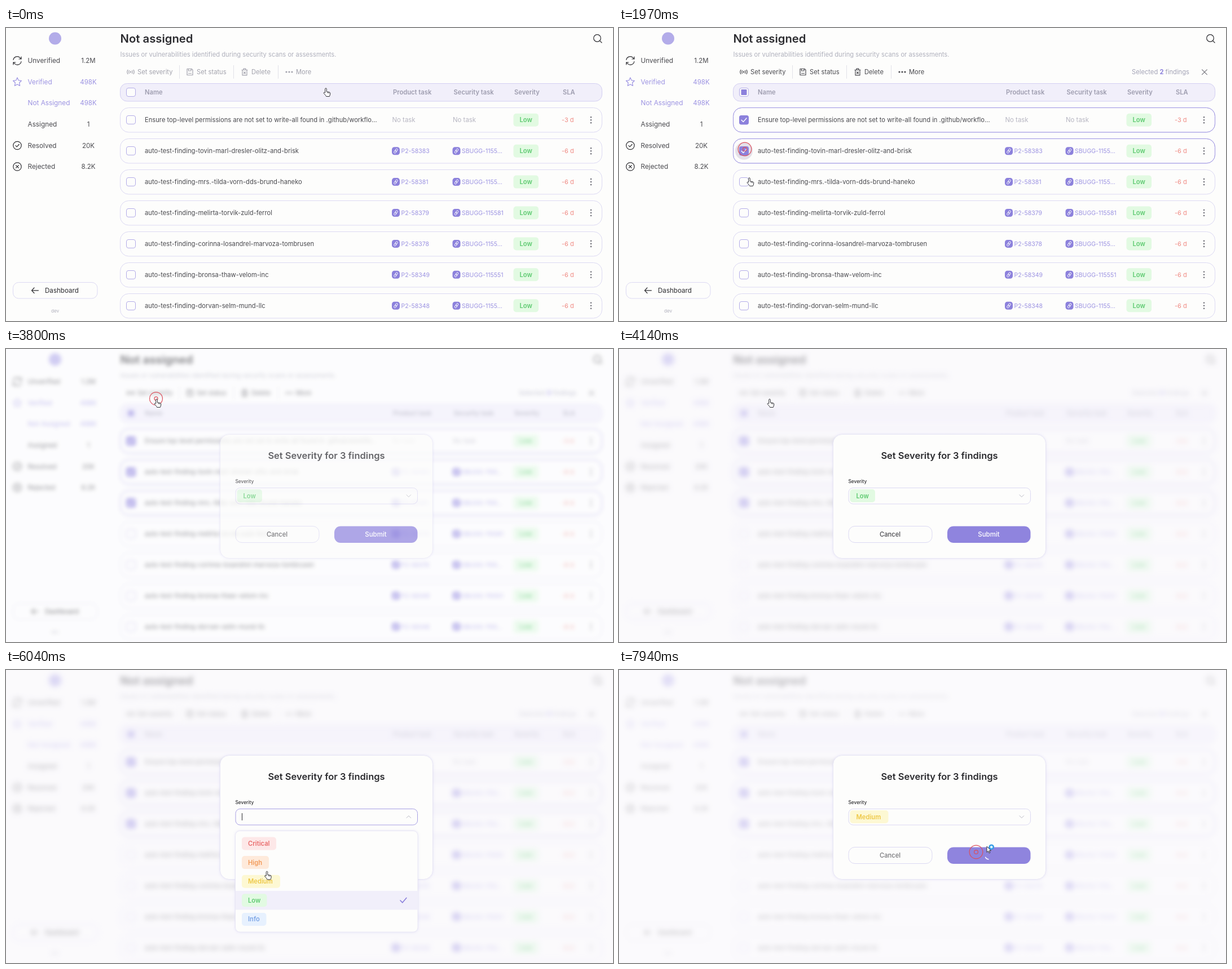
Animation, 1076 px wide and 520 px high, one loop 8 s. Source, as an HTML page:

```html
<!DOCTYPE html>
<html lang="en">
<head>
<meta charset="utf-8">
<title>Findings</title>
<style>
html, body { margin: 0; width: 100%; height: 100%; overflow: hidden; background: #fdfdfc; }
svg { position: fixed; left: 0; top: 0; width: 100%; height: 100%; display: block; }
text { font-family: Inter, "Open Sans", sans-serif; font-size: 11.2px; fill: #4a4a4f; white-space: pre; }
.line { fill: none; stroke-width: 1.2; stroke-linecap: round; stroke-linejoin: round; }
</style>
</head>
<body>
<svg id="stage" viewBox="0 0 1076 520"></svg>
<script>
const LOOP = 8000;
const INK = '#4a4a4f', DARK = '#2b2b2f', PURPLE = '#8c81dc', SOFT = '#9c93e2', EDGE = '#dcd9f3', MUTED = '#b0b1bd', PALE = '#fdfdfc';
const LEVELS = {
  Critical: ['#fde8e8', '#e96c6c', 61],
  High: ['#feeadb', '#f29a59', 48],
  Medium: ['#fdf8d3', '#eec846', 68],
  Low: ['#e2fae2', '#5dca70', 44.5],
  Info: ['#e7f1fe', '#7ca5e6', 43.5]
};

const attrs = o => Object.entries(o).map(([k, v]) => ` ${k}="${v}"`).join('');
const ink = (color, size, o = {}) => ({ style: `fill:${color}` + (size ? `;font-size:${size}px` : ''), ...o });
const text = (x, y, s, o = {}) => `<text x="${x}" y="${y}"${attrs(o)}>${s}</text>`;
const box = (x, y, w, h, r, o = {}) =>
  `<rect x="${x}" y="${y}" width="${w}" height="${h}" rx="${r}"${attrs({ fill: 'none', ...o })}/>`;
const line = (d, color, o = {}) => `<path class="line" d="${d}" stroke="${color}"${attrs(o).replace(/ stroke-width="([^"]+)"/, ' style="stroke-width:$1"')}/>`;
const dot = (x, y, r, o = {}) => `<circle cx="${x}" cy="${y}" r="${r}"${attrs(o)}/>`;
const group = (id, body, o = {}) => `<g id="${id}"${attrs(o)}>${body}</g>`;
const at = (x, y, body) => `<g transform="translate(${x} ${y})">${body}</g>`;
const mid = { 'text-anchor': 'middle' }, bold = { 'font-weight': 600 };
const chip = (x, cy, name) => {
  const [bg, fg, w] = LEVELS[name];
  return box(x, cy - 11.5, w, 23, 5, { fill: bg }) + text(x + 11, cy + 4, name, ink(fg, 11.2, bold));
};

// Sidebar
const round = dot(0, 0, 7.2, { fill: 'none', stroke: DARK, 'stroke-width': 1.2 });
const icons = {
  sync: line('M-7 -1.5A7 7 0 0 1 5.5 -4.5L7 -3M7 -7V-3H3M7 1.5A7 7 0 0 1 -5.5 4.5L-7 3M-7 7V3H-3', DARK),
  star: line('M0 -7.5L2.2 -2.6 7.4 -2 3.6 1.7 4.6 7 0 4.4 -4.6 7 -3.6 1.7 -7.4 -2 -2.2 -2.6Z', SOFT),
  done: round + line('M-3 .2L-.8 2.4 3.2 -2', DARK),
  drop: round + line('M-2.4 -2.4L2.4 2.4M2.4 -2.4L-2.4 2.4', DARK)
};
const menu = [
  ['Unverified', '1.2M', 58, 'sync'], ['Verified', '498K', 95.5, 'star', SOFT],
  ['Not Assigned', '498K', 133, '', SOFT], ['Assigned', '1', 170.5, ''],
  ['Resolved', '20K', 208.5, 'done'], ['Rejected', '8.2K', 246, 'drop']
];
const sidebar = dot(87, 18.5, 11, { fill: '#b3ace9' }) +
  menu.map(([name, count, y, icon, color = INK]) =>
    (icon ? at(20, y, icons[icon]) : '') +
    text(38.5, y + 4, name, ink(color, 11.8)) +
    text(146, y + 4, count, ink(color, 11.5, mid))).join('') +
  box(12.5, 451.5, 149.5, 28.5, 10, { stroke: EDGE }) +
  line('M57.5 465.8H45.5M50 461L45.5 465.8 50 470.5', DARK) +
  text(69, 469.5, 'Dashboard', ink(DARK, 11.6)) +
  text(87, 505, 'dev', ink(MUTED, 8.2, mid));

// Toolbar
const tools = [
  ['Set severity', 221, 233, (c) => dot(0, 0, 1.3, { fill: c }) +
    line('M-2.6 -2.5Q-4.2 0 -2.6 2.5M2.6 -2.5Q4.2 0 2.6 2.5M-5 -3.6Q-7.4 0 -5 3.6M5 -3.6Q7.4 0 5 3.6', c)],
  ['Set status', 326, 338, (c) => line('M-5 -5.5H3L5 -3.5V5.5H-5ZM-2.5 -5.5V-2H2V-5.5M-2.5 2.5H2.5', c)],
  ['Delete', 423, 435, (c) => line('M-5 -3.5H5M-2 -3.5V-5.8H2V-3.5M-4 -3.5V5.8H4V-3.5M-1.5 0L1.5 3M1.5 0L-1.5 3', c)],
  ['More', 502, 514, (c) => [-5, 0, 5].map(x => dot(x, 0, 1.6, { fill: c })).join('')]
];
const tool = ([name, ix, x, icon], color) => at(ix, 78, icon(color)) + text(x, 81.5, name, ink(color));
const toolbar =
  group('hover', box(202, 66, 106, 24, 4, { fill: '#efedfa' })) +
  group('toolsOff', tools.map(t => tool(t, '#a3a3ad')).join('')) +
  group('toolsOn', tools.slice(1).map(t => tool(t, INK)).join('') +
    group('sevInk', tool(tools[0], INK)) + group('sevHot', tool(tools[0], SOFT)) +
    `<text x="909" y="81.5" style="fill:#a3a3b6">Selected <tspan id="count" font-weight="700" fill="${PURPLE}">1</tspan> findings</text>` +
    line('M1033.5 73.8L1042.3 82.6M1042.3 73.8L1033.5 82.6', '#77777f')) +
  [307.5, 403.5, 482.5].map(x => line(`M${x} 66.5V89.5`, '#e2e2e8', { 'stroke-width': 1 })).join('');

// Table
const emptyBox = (cy) => box(213.5, Math.round(cy - 8) + .5, 16, 15, 3.5, { stroke: '#b3ace8', fill: PALE });
const header = box(202.5, 98.5, 854, 31.5, 12, { fill: '#f1effa', stroke: '#d3cff2' }) +
  emptyBox(114) + group('some', box(216.5, 109, 10, 10, 1, { fill: PURPLE })) +
  [[246, 'Name'], [686, 'Product task'], [793.5, 'Security task'], [901, 'Severity'], [987, 'SLA']]
    .map(([x, s]) => text(x, 118, s, ink('#9e9daf', 11.2, bold))).join('');

const rows = [
  ['Ensure top-level permissions are not set to write-all found in .github/workflo…'],
  ['tovin-marl-dresler-olitz-and-brisk', '58383', '1155…'],
  ['mrs.-tilda-vorn-dds-brund-haneko', '58381', '1155…'],
  ['melirta-torvik-zuld-ferrol', '58379', '115581'],
  ['corinna-losandrel-marvoza-tombrusen', '58378', '1155…'],
  ['bronsa-thaw-velom-inc', '58349', '115551'],
  ['dorvan-selm-mund-llc', '58348', '1155…']
];
const rowY = i => 163.3 + i * 54.9;
const ring = x => box(x, -1.7, 5.4, 3.4, 1.7, { stroke: '#fff', 'stroke-width': .9 });
const link = (x, cy, s) => box(x, cy - 7, 14, 14, 4.5, { fill: PURPLE }) +
  at(x + 7, cy, `<g transform="rotate(-55)">${ring(-4.5)}${ring(-.9)}</g>`) +
  text(x + 16.5, cy + 4, s, ink(SOFT, 10.5));
const row = ([name, task, bug], i) => {
  const y = rowY(i);
  const card = color => box(202.5, Math.round(y - 22) + .5, 854, 43.5, 15, { stroke: color });
  const none = x => text(x, y + 4, 'No task', ink('#b7b6c2', 11.4));
  return card(EDGE) +
    (i < 3 ? group('ripple' + i, dot(221.5, y, 15.5, { fill: '#e4e1e9' })) : '') + emptyBox(y) +
    (i < 3 ? group('pick' + i, card(SOFT) +
      box(213, y - 8.3, 17, 16.5, 4, { fill: PURPLE }) +
      line(`M217 ${y}L220.3 ${y + 3.3} 226 ${y - 3.3}`, '#fff', { 'stroke-width': 1.4 })) : '') +
    text(246, y + 4, (task ? 'auto-test-finding-' : '') + name) +
    (task ? link(684, y, 'P2-' + task) + link(791.5, y, 'SBUGG-' + bug) : none(684.5) + none(792)) +
    chip(899.5, y, 'Low') +
    text(985, y + 4, task ? '-6 d' : '-3 d', ink('#ef8a83', 11)) +
    [-5, 0, 5].map(d => dot(1037, y + d, 1.3, { fill: '#74747c' })).join('');
};

const page = sidebar +
  text(202.5, 26, 'Not assigned', ink(DARK, 20.3, bold)) +
  text(202.5, 51, 'Issues or vulnerabilities identified during security scans or assessments.', ink(MUTED)) +
  dot(1048, 18, 6.3, { fill: 'none', stroke: DARK, 'stroke-width': 1.2 }) + line('M1052.8 22.8L1056 26', DARK) +
  toolbar + header + rows.map(row).join('');

// Dialog
const dialog = box(379.5, 151.5, 377, 220, 16, { fill: PALE, stroke: '#e8e6f5', filter: 'url(#soft)' }) +
  text(568, 195, 'Set Severity for 3 findings', ink(DARK, 16.5, { ...mid, ...bold })) +
  text(406.5, 238.3, 'Severity', ink(DARK, 8.3, { 'font-weight': 500 })) +
  box(407, 246.5, 322.5, 28.5, 8, { id: 'field' }) +
  group('low', chip(409.5, 260.5, 'Low')) + group('medium', chip(409.5, 260.5, 'Medium')) +
  group('caret', line('M418.5 254.5V266.5', DARK, { 'stroke-width': 1 })) +
  line('', '#b9b9c4', { id: 'chevron', 'stroke-width': 1 }) +
  box(407, 314.5, 148, 29, 11, { stroke: EDGE }) +
  text(480.5, 333, 'Cancel', { ...mid, id: 'cancel', 'font-weight': 500 }) +
  box(582, 314.5, 147.5, 29.5, 11, { fill: '#8f84de' }) +
  text(655.5, 333, 'Submit', ink('#fff', 11.5, { ...mid, id: 'submit', 'font-weight': 500 })) +
  at(655.5, 329.5, line('M6.5 0A6.5 6.5 0 0 1 3.25 5.63', '#fff', { id: 'spin', 'stroke-width': 1.5 }));

const list = box(406.5, 285.5, 323.5, 179.5, 8, { fill: PALE, stroke: '#e8e6f5', filter: 'url(#soft)' }) +
  box(407, 392, 322.5, 33.5, 0, { fill: '#f1effa' }) +
  line('M699 409L702.8 412.8 709.8 404.5', PURPLE, { 'stroke-width': 1.7 }) +
  Object.keys(LEVELS).map((name, i) => chip(418, 308 + i * 33.6, name)).join('');

const shape = (d) => `<path d="${d}" fill="#fff" stroke="#333338" stroke-linejoin="round"/>`;
const arrow = shape('M0 0V10.5L2.5 8.2 4.2 12 5.8 11.3 4.2 7.6H7.5Z');
const pointers = {
  hand: shape('M-1.3 8V1.2a1.3 1.3 0 0 1 2.6 0V6l5 1q1.6 .4 1.5 2l-.5 3-1 2.5h-5.6l-1.3-2.2-3.2-3.6q-.2-1.6 1.2-1.4z') +
    line('M3.2 6.6V8.6M5.4 7V9', '#333338', { 'stroke-width': .8 }),
  arrow,
  beam: line('M-2.5 -5H-.6L0 -4.4 .6 -5H2.5M0 -4.4V4.4M-2.5 5H-.6L0 4.4 .6 5H2.5', '#333338', { 'stroke-width': 1 }),
  busy: arrow + dot(8.2, 1.2, 3.6, { fill: '#d9f0fd', stroke: '#2f9ae6', 'stroke-width': 2.4 })
};

const stage = document.getElementById('stage');
stage.innerHTML =
  '<filter id="soft" x="-10%" y="-10%" width="120%" height="120%"><feDropShadow dx="0" dy="0" stdDeviation="2" flood-color="#8c81dc" flood-opacity=".2"/></filter>' +
  box(0, 0, 1076, 520, 0, { fill: PALE }) + group('page', page) +
  box(0, 0, 1076, 520, 0, { id: 'veil', fill: '#faf9fe' }) +
  group('dialog', dialog) + group('list', list) +
  [0, 1].map(i => dot(0, 0, 0, { id: 'ring' + i, fill: 'none', stroke: '#dc4f5c', 'stroke-width': 1.2 })).join('') +
  group('cursor', Object.entries(pointers).map(([k, v]) => group(k, v)).join(''));

// Motion: [time, x, y] of the pointer's hot spot
const path = [
  [80, 567, 107], [750, 223, 160], [950, 223, 160], [1500, 223, 215], [1760, 223, 215], [1970, 231, 266],
  [2120, 225, 270], [2350, 225, 270], [2950, 256, 83], [3100, 257, 82], [3270, 266, 88], [3640, 266, 88],
  [3800, 267, 89], [4140, 267, 89], [4880, 470, 262], [5200, 470, 262], [5400, 471, 276], [6250, 461, 372],
  [6580, 461, 372], [6640, 481, 371], [6760, 486, 370], [7480, 633, 323], [7700, 633, 323], [7940, 652, 313]
];
const clicks = [[800, 223, 160], [1700, 223, 215], [2250, 225, 270], [3400, 266, 88],
  [4980, 470, 262], [6600, 461, 372], [7670, 633, 323]];
const kinds = [[0, 'hand'], [4250, 'arrow'], [4820, 'beam'], [5480, 'hand'], [6620, 'arrow'], [7420, 'hand'], [7760, 'busy']];
const picks = [840, 1740, 2300];
const OPEN = 3640, DROP = 5020, CHOSEN = 6620, SENT = 7770;

const $ = id => document.getElementById(id);
const show = (id, on) => { $(id).style.display = on ? '' : 'none'; };
const ramp = (t, from, len) => Math.max(0, Math.min(1, (t - from) / len));
const smooth = u => u * u * (3 - 2 * u);
const last = (table, t) => table.filter(r => r[0] <= t).pop();
// The view hangs shortly before the dialog opens
const live = t => t < 3500 ? t : Math.max(3500, t - 140);

function position(t) {
  const i = path.findIndex(p => p[0] > t);
  if (i < 0) return path[path.length - 1].slice(1);
  if (i === 0) return path[0].slice(1);
  const [t0, x0, y0] = path[i - 1], [t1, x1, y1] = path[i];
  const u = smooth((t - t0) / (t1 - t0));
  return [x0 + (x1 - x0) * u, y0 + (y1 - y0) * u];
}

function rings(t) {
  const click = last(clicks, t);
  [0, 1].forEach(i => {
    const age = click ? live(t) - live(click[0]) - i * 210 : -1;
    const on = age >= 0 && age < 380;
    show('ring' + i, on);
    if (!on) return;
    const el = $('ring' + i);
    el.setAttribute('cx', click[1]);
    el.setAttribute('cy', click[2]);
    el.setAttribute('r', 1 + age * .04);
    el.setAttribute('opacity', 1 - ramp(age, 280, 100));
  });
}

function draw(t) {
  const count = picks.filter(p => p <= t).length;
  picks.forEach((p, i) => {
    show('pick' + i, t >= p);
    show('ripple' + i, count === i + 1 && t < OPEN);
  });
  show('some', count);
  show('toolsOn', count);
  show('toolsOff', !count);
  $('count').textContent = count;
  const hot = t >= 2930 && t < OPEN;
  show('hover', hot);
  show('sevHot', hot);
  show('sevInk', !hot);

  const fade = smooth(ramp(t, OPEN, 250));
  $('page').style.filter = fade ? `blur(${5 * fade}px)` : 'none';
  $('veil').setAttribute('opacity', .58 * fade + .08 * ramp(t, SENT, 60));
  $('dialog').setAttribute('opacity', fade);
  show('dialog', fade);

  const open = t >= DROP && t < CHOSEN;
  show('list', open);
  $('list').setAttribute('opacity', ramp(t, DROP, 150));
  $('field').setAttribute('stroke', open ? '#a79fe4' : EDGE);
  $('chevron').setAttribute('d', open ? 'M710 262.5L713.8 258.7 717.6 262.5' : 'M710 258.8L713.8 262.6 717.6 258.8');
  show('low', t < DROP);
  show('medium', t >= CHOSEN);
  show('caret', open && (t - DROP) % 1000 < 500);

  const sent = t >= SENT;
  show('submit', !sent);
  show('spin', sent);
  $('cancel').setAttribute('opacity', sent ? .75 : 1);
  $('spin').setAttribute('transform', `rotate(${95 + (t - 7940) * .36})`);

  rings(t);
  const kind = last(kinds, t)[1];
  Object.keys(pointers).forEach(k => show(k, k === kind));
  const [x, y] = position(t);
  $('cursor').setAttribute('transform', `translate(${x.toFixed(2)} ${y.toFixed(2)})`);
}

const start = performance.now();
function tick() {
  draw((performance.now() - start) % LOOP);
  requestAnimationFrame(tick);
}
tick();
</script>
</body>
</html>
```
